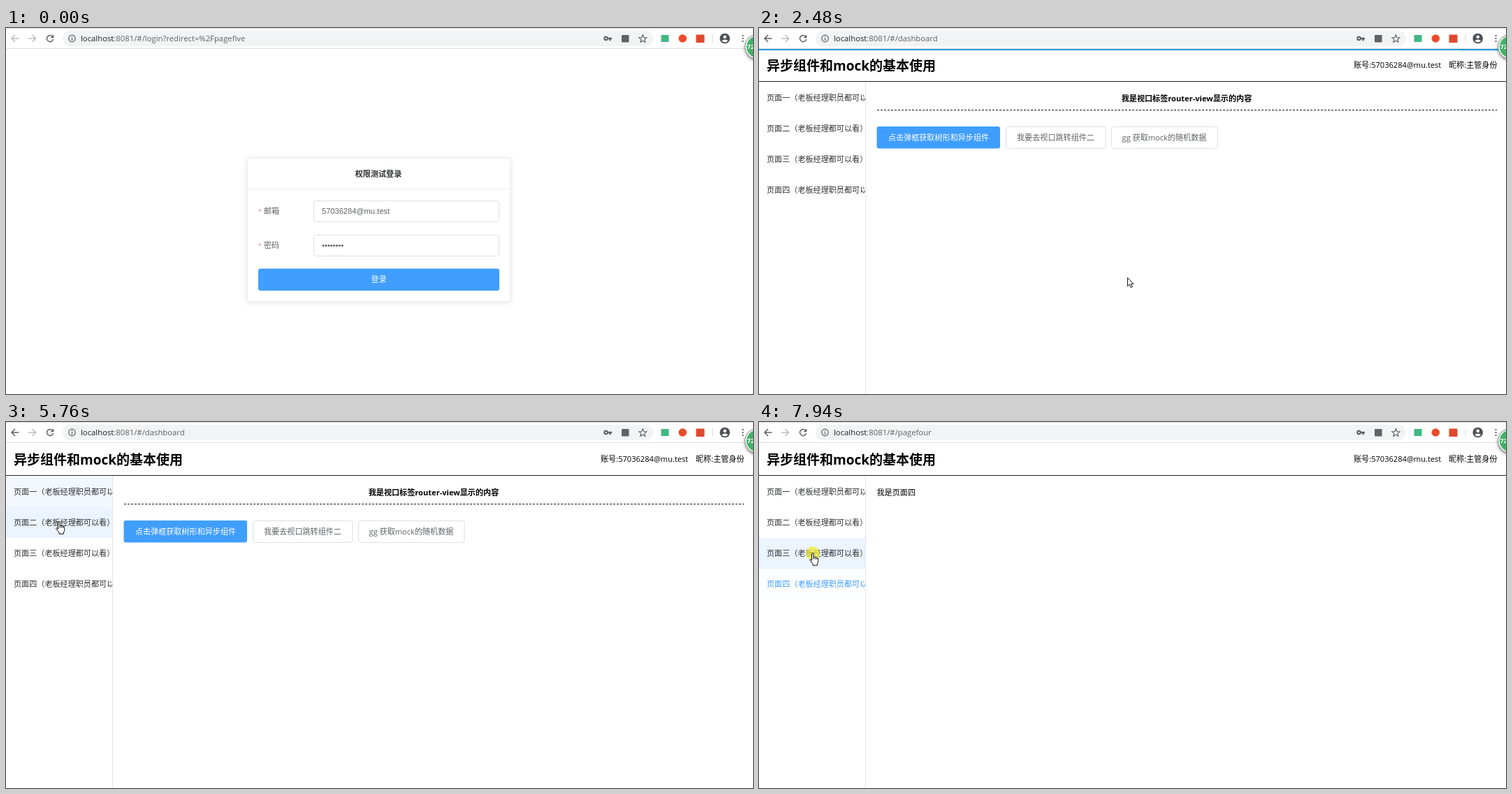
Write an HTML page that moves like this. It is 1069x524 px and loops after 8 s.

```html
<!DOCTYPE html>
<html lang="zh-CN">
<head>
<meta charset="utf-8">
<title>权限测试登录</title>
<style>
  html, body { margin: 0; width: 100%; height: 100%; overflow: hidden; background: #fff; }
  svg { display: block; width: 100%; height: 100%; }
  text { font: 11.1px "Open Sans", "Noto Sans CJK SC", "Noto Sans CJK", sans-serif; fill: #000; white-space: pre; }
  .url { font-size: 11.3px; }
  .title { font-size: 19px; font-weight: 700; }
  .bold { font-weight: 700; }
  .mid { text-anchor: middle; }
  .soft { fill: #606266; }
  .white { fill: #fff; font-weight: 500; }
  .star { fill: #f78989; font-family: "Liberation Sans", sans-serif; }
  .mail { font-family: "Liberation Sans", sans-serif; }
  .badge { font-size: 9px; font-weight: 700; fill: #fff; }
  .box { fill: #fff; stroke: #dcdfe6; }
  .line { fill: none; stroke: #5f6368; stroke-width: 1.5; }
  .thin { stroke-width: 1.2; }
  .card { filter: drop-shadow(0 1.6px 4.7px rgba(0,0,0,.1)); }
  .ball { filter: drop-shadow(0 2px 2px rgba(0,0,0,.45)); }
</style>
</head>
<body>
<svg viewBox="0 0 1069 524">
  <defs>
    <clipPath id="sideClip"><rect y="78" width="153" height="446"/></clipPath>
  </defs>
  <rect width="1069" height="524" fill="#fff"/>

  <g id="login">
    <g class="card"><rect x="345.5" y="186.5" width="376" height="205" rx="3" fill="#fff" stroke="#ebeef5"/></g>
    <path d="M345 230.5H722" stroke="#ebeef5"/>
    <text class="mid bold" x="533" y="213" style="fill:#303133">权限测试登录</text>
    <text class="star" x="361" y="267">*</text>
    <text class="soft" x="369" y="266">邮箱</text>
    <rect class="box" x="440.5" y="247.5" width="265" height="30" rx="3"/>
    <text class="soft mail" x="452" y="266">57036284@mu.test</text>
    <text class="star" x="361" y="316">*</text>
    <text class="soft" x="369" y="315">密码</text>
    <rect class="box" x="440.5" y="296.5" width="265" height="30" rx="3"/>
    <g id="dots" fill="#606266"></g>
    <rect id="submit" x="361" y="344.5" width="345" height="31.5" rx="3"/>
    <text class="mid white" x="533.5" y="364">登录</text>
  </g>

  <g id="app">
    <text class="title" x="11" y="61">异步组件和mock的基本使用</text>
    <text x="851" y="57">账号:57036284@mu.test</text>
    <text x="987" y="57">昵称:主管身份</text>
    <path d="M0 76.5H1069" stroke="#222"/>
    <g id="menu" clip-path="url(#sideClip)"></g>
    <path d="M152.5 77V524" stroke="#e2e2e2"/>
    <g id="home">
      <text class="mid bold" x="612" y="105">我是视口标签router-view显示的内容</text>
      <path d="M169 117.5H1056" stroke="#111" stroke-dasharray="3 2"/>
      <rect x="168.5" y="141" width="176.5" height="31.5" rx="3" fill="#409eff"/>
      <text class="mid white bold" x="257" y="161">点击弹框获取树形和异步组件</text>
      <rect class="box" x="353.5" y="141.5" width="142.5" height="31" rx="3"/>
      <text class="mid soft" x="424.5" y="161">我要去视口跳转组件二</text>
      <rect class="box" x="504.5" y="141.5" width="151.5" height="31" rx="3"/>
      <text class="mid soft" x="580" y="161">gg 获取mock的随机数据</text>
    </g>
    <text id="body" x="168.5" y="105"></text>
  </g>

  <g id="toolbar">
    <rect width="1069" height="30" fill="#fff"/>
    <path d="M0 .5H1069M0 29.5H1069" stroke="#dcdde0"/>
    <path id="back" class="line" d="M18.5 15H8M13 10L8 15L13 20"/>
    <path class="line" d="M32 15H42.5M37.5 10L42.5 15L37.5 20" style="stroke:#bbbdc0"/>
    <path class="line" d="M66.6 12A4.6 4.6 0 1 0 67.6 16"/>
    <path d="M68.4 9.5V14.3H63.6Z" fill="#5f6368"/>
    <rect x="81" y="4" width="845" height="22" rx="11" fill="#f1f3f4"/>
    <circle class="line thin" cx="94.5" cy="15" r="4.8"/>
    <path class="line thin" d="M94.5 12V13.2M94.5 14.2V18"/>
    <text class="url" x="107" y="19" style="fill:#202124">localhost<tspan id="path" fill="#5f6368"></tspan></text>
    <g fill="#5f6368">
      <path fill-rule="evenodd" d="M858.5 11.5a3.4 3.4 0 0 1 3.2 2.3H867v2.4h-1.3v2h-2.4v-2h-1.6a3.4 3.4 0 1 1-3.2-4.7zm0 2.2a1.2 1.2 0 1 0 .01 0z"/>
      <rect x="881" y="10" width="10.5" height="10.5" rx="1"/>
    </g>
    <path class="line thin" d="M911.3 9.8l1.5 3.7 4 .3-3 2.6.9 3.9-3.4-2.1-3.4 2.1.9-3.9-3-2.6 4-.3z"/>
    <rect x="937.5" y="10" width="11" height="10" fill="#41b883"/>
    <circle cx="968.3" cy="15" r="5.8" fill="#ea4c2b"/>
    <rect x="987.5" y="9.5" width="12" height="11.5" rx="1" fill="#e0492e"/>
    <path d="M1011 9V21" stroke="#d3d5d8"/>
    <circle cx="1028.7" cy="15" r="7.3" fill="#4d5156"/>
    <circle cx="1028.7" cy="12.7" r="2.3" fill="#fff"/>
    <path d="M1024.2 18.3q4.5-3.8 9 0a5.8 5.8 0 0 1-9 0z" fill="#fff"/>
    <path d="M1053.5 10h2v2h-2zM1053.5 14h2v2h-2zM1053.5 18h2v2h-2z" fill="#5f6368"/>
  </g>

  <g id="bar" fill="#29d">
    <rect id="glow" y="30" width="60" height="4" opacity=".15"/>
    <rect id="fill" y="30" height="2"/>
  </g>

  <g class="ball"><circle cx="1075" cy="27" r="17.8" fill="#8b9890"/></g>
  <circle cx="1075" cy="27" r="16.8" fill="#fff"/>
  <circle cx="1075" cy="27" r="15.3" fill="#42b366"/>
  <text id="badge" class="badge" x="1060.5" y="29.5"></text>

  <circle id="click" r="10" fill="#f4ee2c" opacity=".7"/>
  <g id="cursor" fill="#fff" stroke="#111" stroke-linejoin="round">
    <path id="arrow" d="M.5 .5V12.6L3.3 10L5.3 14.7L7.3 13.8L5.3 9.3H9Z"/>
    <path id="hand" d="M3.5 11.5V2Q3.5 .5 4.8 .5T6 2V6.2Q8 5.5 8.4 6.8Q10.2 6.2 10.7 7.6Q12.7 7.2 12.7 9.2V12.5Q12.7 14.5 11.4 16V18.2H5V16.2L1 11.2Q.2 9.9 1.4 9.5T3.5 11.5Z M6 6.2V9.5M8.4 6.8V9.5M10.7 7.6V9.8"/>
  </g>
</svg>
<script>
const LOOP = 8000, TICK = 77, MENU_TOP = 78, ROW = 44;
const $ = id => document.getElementById(id);
const clamp = v => Math.max(0, Math.min(1, v));
const lerp = (a, b, p) => a + (b - a) * p;
const easeOut = p => 1 - (1 - p) ** 2;

// Cursor moves: start, end, x, y; the screen ticks from the start of each
const START = [806, 484];
const MOVES = [
  [130, 670, 525, 357], [1540, 1690, 525, 357], [2000, 2140, 525, 357], [2310, 2700, 528, 357],
  [2850, 3235, 1033, 56], [3235, 3620, 997, 59], [3790, 3940, 1060, 60], [4190, 4420, 934, 61],
  [4590, 4741, 333, 107], [4741, 4969, 33, 101], [4969, 5120, 84, 95], [5290, 5290, 89, 95],
  [5440, 5440, 84, 95], [5610, 5764, 71, 142], [6150, 6380, 64, 186], [6760, 7000, 70, 231],
  [7620, 7860, 72, 187]
];
const MENU_CLICKS = [5915, 6530, 7220];
const CLICKS = [1540, 1617, ...MENU_CLICKS, 7925];

const PAGES = [
  { at: 0, path: 'login?redirect=%2Fpagefive' },
  { at: 2310, path: 'dashboard' },
  ...['two', 'three', 'four'].map((name, i) => ({
    at: MENU_CLICKS[i] + TICK, path: 'page' + name, body: '我是页面' + '二三四'[i], item: i + 1
  }))
];

function add(parent, tag, attrs, text = '') {
  const el = document.createElementNS('http://www.w3.org/2000/svg', tag);
  for (const k in attrs) el.setAttribute(k, attrs[k]);
  el.textContent = text;
  return parent.appendChild(el);
}
const set = (id, attrs) => { for (const k in attrs) $(id).setAttribute(k, attrs[k]); };
const show = (id, on) => $(id).setAttribute('visibility', on ? 'inherit' : 'hidden');

for (let i = 0; i < 8; i++) add($('dots'), 'circle', { cx: 454 + i * 3.9, cy: 311.5, r: 1.5 });

const items = [...'一二三四'].map((n, i) => {
  const y = MENU_TOP + i * ROW;
  const who = i % 3 ? '老板经理' : '老板经理职员';
  return {
    bg: add($('menu'), 'rect', { y, width: 152, height: ROW, fill: '#ebf4ff' }),
    text: add($('menu'), 'text', { x: 11, y: y + 26 }, `页面${n}（${who}都可以看）`)
  };
});

function snap(t) {
  const last = MOVES.filter(m => m[0] <= t).pop();
  return last ? last[0] + TICK * Math.floor((t - last[0]) / TICK + 0.1) : 0;
}

function cursorAt(t) {
  let [x, y] = START;
  for (const [from, to, tx, ty] of MOVES) {
    if (from > t) break;
    const p = easeOut(clamp((t - from + 1) / (to - from + 1)));
    x = lerp(x, tx, p);
    y = lerp(y, ty, p);
  }
  return [Math.round(x), Math.round(y)];
}

// The menu reacts only once the pointer starts down the list
function hoverAt(t) {
  return t < 5600 ? -1 : Math.floor((cursorAt(t)[1] - MENU_TOP) / ROW);
}

// Full under the pointer, fading out over 300 ms after it leaves
function glowOf(i, t) {
  for (let age = 0; age < 300; age += 20) {
    if (hoverAt(t - age) === i) return 1 - age / 300;
  }
  return 0;
}

function activeOf(i, t) {
  const k = PAGES.findIndex(p => p.item === i);
  if (k < 0) return 0;
  const fade = page => page ? clamp((t - page.at) / 160) : 0;
  return fade(PAGES[k]) - fade(PAGES[k + 1]);
}

const blend = p => `rgb(${lerp(48, 64, p)}, ${lerp(49, 158, p)}, ${lerp(51, 255, p)})`;

function drawMenu(t) {
  items.forEach((item, i) => {
    item.bg.setAttribute('opacity', glowOf(i, t));
    item.text.style.fill = blend(activeOf(i, t));
  });
}

function drawBar(t, page) {
  const age = t - page.at;
  const width = page.at ? lerp(330, 1063, clamp(age / 114)) : lerp(30, 84, clamp((t - 2000) / 150));
  const alpha = page.at ? 1 - clamp((age - 150) / 230) : +(t >= 2000);
  set('bar', { opacity: alpha });
  set('fill', { width });
  set('glow', { x: width - 60 });
}

function render(now) {
  const t = snap(now);
  const page = PAGES.filter(p => p.at <= t).pop();
  const inApp = page.at > 0;
  const clicking = CLICKS.some(c => t >= c && t < c + TICK);
  const [x, y] = cursorAt(t);
  const overButton = !inApp && x < 706 && y < 376;
  const hand = overButton || (inApp && x < 153);

  show('login', !inApp);
  show('app', inApp);
  show('home', inApp && !page.body);
  $('path').textContent = ':8081/#/' + page.path;
  $('body').textContent = page.body || '';
  $('back').style.stroke = inApp ? '#5f6368' : '#bbbdc0';
  set('submit', { fill: !overButton ? '#409eff' : clicking ? '#3a8ee6' : '#66b1ff' });
  $('badge').textContent = t >= 3000 && t < 4880 ? '73' : '72';
  drawMenu(t);
  drawBar(t, page);

  show('cursor', t > 0);
  show('arrow', !hand);
  show('hand', hand);
  set('cursor', { transform: `translate(${x} ${y})` });
  show('click', clicking);
  set('click', { cx: x + 5, cy: y + 1 });
}

const begin = performance.now();
function frame() {
  render((performance.now() - begin) % LOOP);
  requestAnimationFrame(frame);
}
frame();
</script>
</body>
</html>
```
